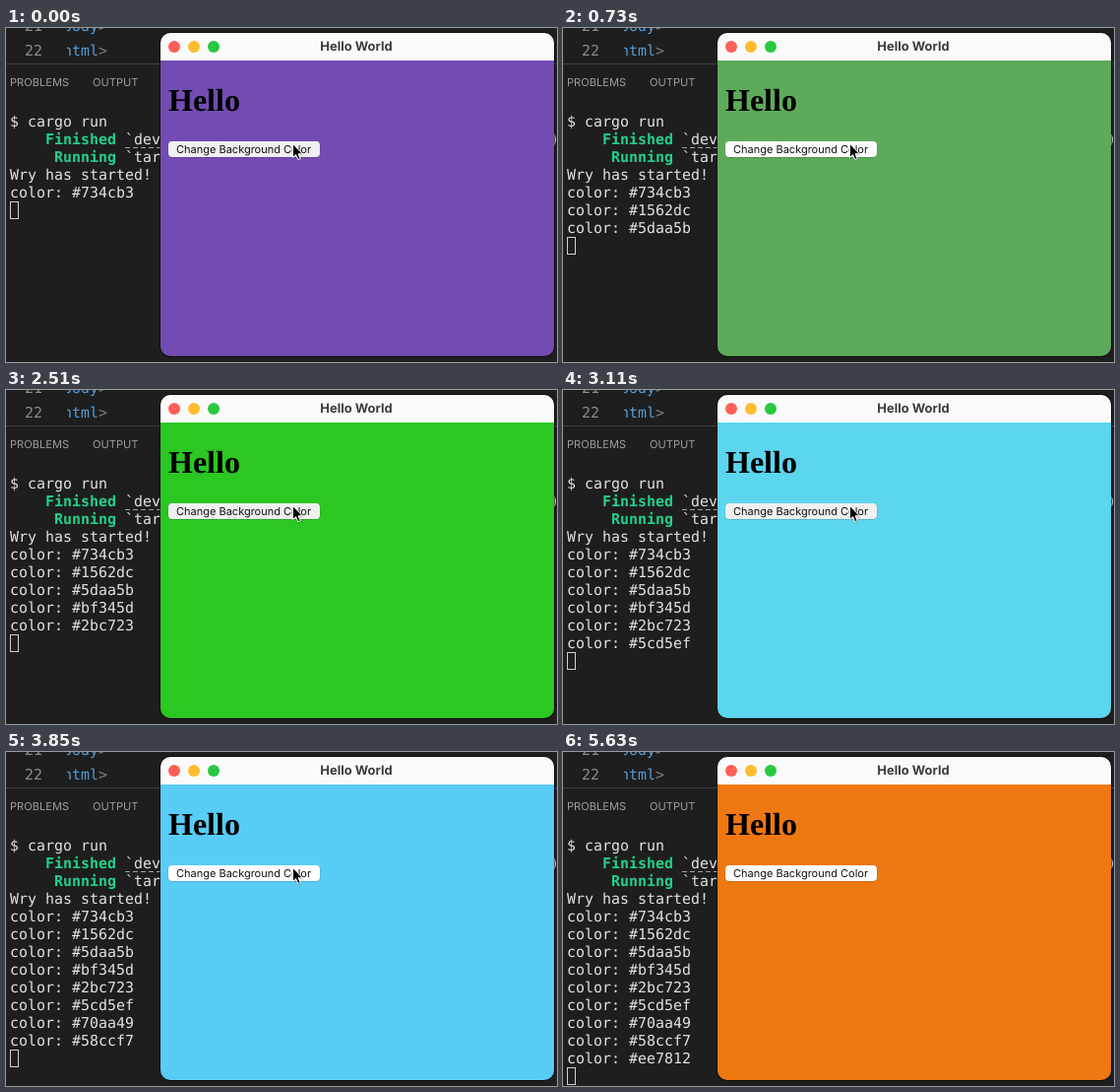
Recreate the animation shown at these times as an HTML page. Size 560 px wide and 339 px high, loop 5.76 s.

```html
<!DOCTYPE html>
<html lang="en">
<head>
<meta charset="utf-8">
<title>Hello World</title>
<style>
  html, body { margin: 0; width: 100%; height: 100%; overflow: hidden; background: #1e1e1e; }
  svg { display: block; width: 560px; height: 339px; }
  text { white-space: pre; text-rendering: geometricPrecision; }
  .mono { font: 14.95px "DejaVu Sans Mono", monospace; fill: #e2e2e2; }
  .ok { font-weight: bold; fill: #23d18b; }
  .num { fill: #8c8c8c; }
  .tag { fill: #569cd6; }
  .punct { fill: #808080; }
  .ui { font-family: Inter, "Open Sans", sans-serif; }
  .tab { font-size: 11.1px; fill: #9d9d9d; }
</style>
</head>
<body>
<svg viewBox="0 0 560 339">
  <defs>
    <clipPath id="code"><rect x="62" width="95" height="36"/></clipPath>
    <clipPath id="frame"><rect x="157" y="5" width="400" height="328" rx="10"/></clipPath>
  </defs>
  <rect width="560" height="339" fill="#1e1e1e"/>

  <g class="mono">
    <text class="num" x="19" y="2.5">21</text>
    <text class="num" x="19" y="27.5">22</text>
    <g clip-path="url(#code)">
      <text class="tag" x="58" y="2.5">body<tspan class="punct">&gt;</tspan></text>
      <text class="tag" x="58" y="27.5">html<tspan class="punct">&gt;</tspan></text>
    </g>
  </g>
  <path d="M0 36.5H560" stroke="#414141"/>
  <text class="ui tab" x="4" y="58.7">PROBLEMS</text>
  <text class="ui tab" x="88" y="58.7">OUTPUT</text>

  <g id="term" class="mono"></g>
  <path d="M121 121.5H157" stroke="#a0a0a0" stroke-dasharray="5 3"/>
  <rect id="caret" x="4.5" width="8" height="17" fill="none" stroke="#d0d0d0"/>

  <rect x="156.5" y="4.5" width="401" height="329" rx="10.5" fill="none" stroke="#000" stroke-opacity=".5"/>
  <g clip-path="url(#frame)">
    <rect id="page" x="157" y="33" width="400" height="300"/>
    <rect x="157" y="5" width="400" height="28" fill="#fafafa"/>
  </g>
  <circle cx="171" cy="19" r="6" fill="#ff5f57"/>
  <circle cx="191" cy="19" r="6" fill="#febc2e"/>
  <circle cx="211" cy="19" r="6" fill="#28c840"/>
  <text class="ui" x="356" y="23" font-size="13" font-weight="700" text-anchor="middle" fill="#3c3c3c">Hello World</text>
  <text x="165" y="83.5" font-size="32" font-weight="700" font-family="'Liberation Serif', serif">Hello</text>
  <rect x="164.7" y="115" width="154.6" height="16.6" rx="4.3" fill="#000" fill-opacity=".28"/>
  <rect id="btn" x="165" y="115" width="154" height="16" rx="4"/>
  <text class="ui" x="173" y="127" font-size="11" fill="#111">Change Background Color</text>

  <g id="mouse" stroke-linejoin="round">
    <path d="M2 2V16L5 13.4L7.2 18.2L9.8 17L7.8 12.4H12.5Z" fill="#000" fill-opacity=".18"/>
    <path d="M1.5 .5V14.5L4.6 11.6L6.8 16.7L9.2 15.7L7 10.8H11.4Z" fill="#000" stroke="#fff"/>
  </g>
</svg>
<script>
const LOOP = 5760;
const $ = id => document.getElementById(id);
const rowTop = i => 86 + 18 * i;

// [page colour, shown at, logged at]
const colors = [
  ["#734cb3", 0, 0], ["#1562dc", 140, 290], ["#5daa5b", 730, 730],
  ["#bf345d", 1330, 1480], ["#2bc723", 2070, 2070], ["#5cd5ef", 2660, 2660],
  ["#70aa49", 3260, 3260], ["#58ccf7", 3850, 3850], ["#ee7812", 4450, 4450]
];

// [from, to] while the button is held down
const presses = [[0, 140], [1920, 2070], [2510, 2660], [3110, 3260], [3700, 3850], [4300, 4450]];

// [time, x, y]
const moves = [
  [0, 290, 117], [4900, 351, 188], [5050, 453, 294], [5190, 477, 316],
  [5340, 506, 329], [5490, 517, 338], [5630, 560, 350]
];

function print(str, col, row, cls = "") {
  const t = document.createElementNS("http://www.w3.org/2000/svg", "text");
  t.setAttribute("x", 4 + 9 * col);
  t.setAttribute("y", rowTop(row) + 14);
  t.setAttribute("class", cls);
  t.textContent = str;
  return $("term").appendChild(t);
}

print("$ cargo run", 0, 0);
print("Finished", 4, 1, "ok");
print("`dev", 13, 1);
print(")", 61, 1);
print("Running", 5, 2, "ok");
print("`tar", 13, 2);
print("Wry has started!", 0, 3);
const logs = colors.map(([c], i) => print("color: " + c, 0, 4 + i));

const latest = (list, t, key) => list.filter(s => s[key] <= t).pop();

function draw(now) {
  const t = now % LOOP;
  const count = colors.filter(c => c[2] <= t).length;
  logs.forEach((l, i) => l.setAttribute("visibility", i < count ? "visible" : "hidden"));
  $("caret").setAttribute("y", rowTop(4 + count) + 0.5);
  $("page").setAttribute("fill", latest(colors, t, 1)[0]);
  const held = presses.some(([a, b]) => t >= a && t < b);
  $("btn").setAttribute("fill", held ? "#f0f0f0" : "#fff");
  const [, x, y] = latest(moves, t, 0);
  $("mouse").setAttribute("transform", `translate(${x} ${y})`);
}

const start = performance.now();
function tick() {
  draw(performance.now() - start);
  requestAnimationFrame(tick);
}
tick();
</script>
</body>
</html>
```
